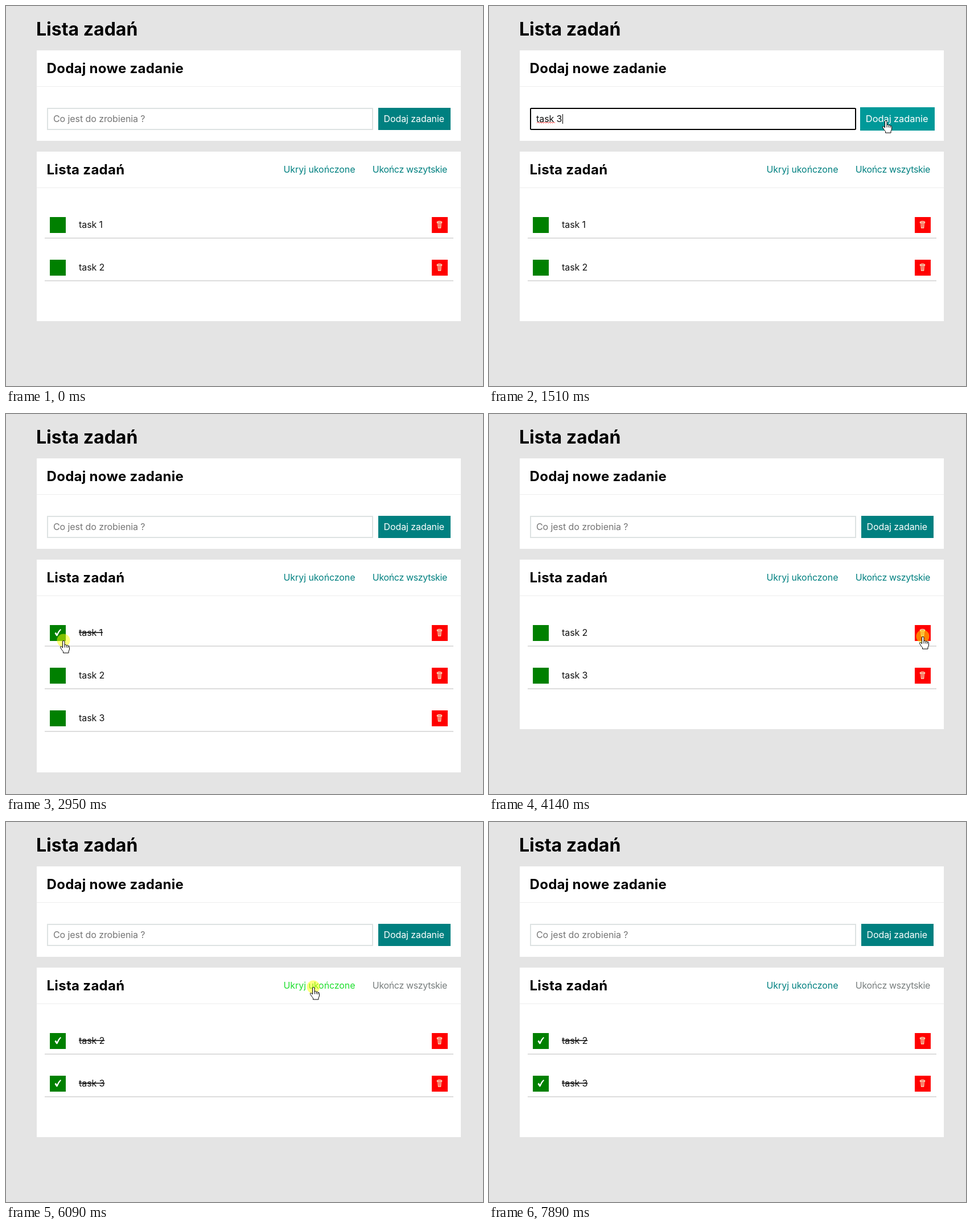
Write an HTML page that moves like this. It is 838x668 px and loops after 8000 ms.

```html
<!DOCTYPE html>
<html lang="pl">
<head>
<meta charset="utf-8">
<title>Lista zadań</title>
<style>
  html, body { margin: 0; width: 100%; height: 100%; overflow: hidden; background: #e4e4e4; }
  svg { display: block; width: 100%; height: 100%; }
  rect { shape-rendering: crispEdges; }
  text { font: 400 16px Inter, "Open Sans", sans-serif; letter-spacing: -.08px; white-space: pre; }
  .h1 { font-size: 32px; font-weight: 700; letter-spacing: 0; }
  .h2 { font-size: 24px; font-weight: 700; letter-spacing: .3px; }
  .end { text-anchor: end; }
  .tight { letter-spacing: -.35px; }
  .done { text-decoration: line-through; }
</style>
</head>
<body>
<svg viewBox="0 0 838 668">
  <rect width="838" height="668" fill="#e4e4e4"/>
  <text class="h1" x="53" y="52">Lista zadań</text>

  <rect x="54" y="78" width="745" height="159" fill="#fff"/>
  <path d="M54 141.500H799" stroke="#eee"/>
  <text class="h2" x="71.500" y="118">Dodaj nowe zadanie</text>
  <rect id="field" x="73" y="180" width="571" height="37" fill="#fff" stroke-width="2"/>
  <text id="entry" x="83" y="204"></text>
  <path id="squiggle" fill="none" stroke="#f33" stroke-width=".9"/>
  <path id="caret" d="M0 190V207" stroke="#000"/>
  <g id="button">
    <rect id="face" x="654" y="179" width="127" height="39"/>
    <text x="663.500" y="204" fill="#fff">Dodaj zadanie</text>
  </g>

  <rect id="card" x="54" y="256" width="745" fill="#fff"/>
  <path d="M54 319.500H799" stroke="#eee"/>
  <text class="h2" x="71.500" y="296">Lista zadań</text>
  <text id="toggle" class="end" x="613.500" y="293"></text>
  <text id="finish" class="end tight" x="775" y="293">Ukończ wszytskie</text>
  <g id="rows"></g>

  <circle id="press" r="11.500" fill="#ff0" fill-opacity=".5"/>
  <g id="cursor" stroke="#000" fill="#fff" stroke-linejoin="round">
    <path id="hand" d="M-1.500 13V2Q-1.500 .5 .2 .5T2 2V8Q4.500 6.500 5.200 8.700Q7.500 7.500 8 9.700Q10.500 9 10.500 11.500V15Q10.500 17 9 19V22H-.5V19.500Q-3 17 -5.500 12.500Q-6 10.500 -4.200 10.600Q-3 10.800 -1.500 13ZM2 8V12.500M5.200 9V12.500M8 10V13"/>
    <path id="arrow" d="M0 0V16L3.700 12.500 6.200 18 8.600 17 6.200 11.500H11.300Z"/>
    <path id="beam" d="M-3-8H3M0-8V8M-3 8H3" fill="none"/>
  </g>
</svg>
<script>
const LOOP = 8000;
const $ = id => document.getElementById(id);
const set = (el, attrs) => { for (const k in attrs) el.setAttribute(k, attrs[k]); };
const show = (el, on) => { el.style.display = on ? "" : "none"; };
const within = (t, a, b) => t >= a && t < b;
const linear = (t, a, b) => Math.min(1, Math.max(0, (t - a) / (b - a)));
const ramp = (t, a, b) => {
  const k = linear(t, a, b);
  return k * k * (3 - 2 * k);
};
const mix = (a, b, k) => `rgb(${a.map((v, i) => Math.round(v + (b[i] - v) * k))})`;

const TEAL = [0, 128, 128], BRIGHT = [0, 153, 153], LIME = [30, 222, 46], GREY = [120, 126, 126];

// The pointer glides to each stop, then clicks; the page reacts a moment later.
const SETTLE = 100, REACT = 130, GLOW = 220;
const start = { x: 698, y: 522, from: 0, to: 70, shape: "arrow" };
const field = { x: 320, y: 202, from: 70, to: 340, shape: "beam" };
const add = { x: 697, y: 201, from: 940, to: 1420, shape: "hand" };
const check = { x: 101, y: 398, from: 2290, to: 2640, shape: "hand" };
const bin = { x: 762, y: 391, from: 3140, to: 3900, shape: "hand" };
const finish = { x: 694, y: 291, from: 4240, to: 4740, shape: "hand" };
const hide = { x: 540, y: 290, from: 5450, to: 5950, shape: "hand" };
const reveal = { x: 541, y: 290, from: 6300, to: 6950, shape: "hand" };
const leave = { x: 528, y: -25, from: 7200, to: 7850, shape: "arrow" };
const STOPS = [start, field, add, check, bin, finish, hide, reveal, leave];

const clickAt = stop => stop.to + SETTLE;
const after = (t, stop) => t >= clickAt(stop) + REACT;
const hover = (t, stop, next) =>
  ramp(t, stop.to - 120, stop.to + 40) - ramp(t, next.from, next.from + 280);

const PITCH = 75.2;
const rows = [0, 1, 2].map(i => {
  const g = document.createElementNS("http://www.w3.org/2000/svg", "g");
  set(g, { transform: `translate(0 ${Math.round(PITCH * i)})` });
  g.innerHTML = `
    <rect x="77" y="371" width="28" height="28" fill="#008000"/>
    <path class="tick" fill="#fff" d="M85.500 385.500L87.500 383.500 89.500 386.500Q92 381 95.500 378L97 379Q92.500 384 90.300 390.300H88.500Z"/>
    <text x="128" y="389.500" fill="#111"></text>
    <rect x="748" y="371" width="28" height="28" fill="#f00"/>
    <path d="M757.500 379.500Q761.500 377.500 765.500 379.500V381H757.500ZM759 381L759.600 390H763.600L764.200 381M761.600 382V389"
      fill="none" stroke="#f5e3c0" stroke-width="1.300"/>
    <path d="M68 408H786" stroke="#ddd" stroke-width="2"/>`;
  $("rows").append(g);
  return { g, label: g.querySelector("text"), tick: g.querySelector(".tick") };
});
set($("squiggle"), { d: "M84 206" + "l2-2 2 2".repeat(8) });

function visibleTasks(t) {
  if (after(t, hide) && !after(t, reveal)) return [];
  return [1, 2, 3].filter(n => (n > 1 || !after(t, bin)) && (n < 3 || after(t, add)));
}

function drawForm(t) {
  const focus = within(t, clickAt(field), clickAt(check));
  const letters = Math.max(0, Math.ceil((t - 680) / 85));
  const typed = after(t, add) ? "" : "task 3".slice(0, letters);
  const entry = $("entry");
  set($("field"), { stroke: focus ? "#000" : "#dde2e2", rx: focus ? 2 : 0 });
  entry.textContent = typed || "Co jest do zrobienia ?";
  set(entry, { fill: typed ? "#111" : "#757575" });
  show($("squiggle"), typed.length > 4);
  show($("caret"), focus && (typed || t % 1000 < 500));
  const x = 83.5 + (typed ? entry.getComputedTextLength() : 0);
  set($("caret"), { transform: `translate(${Math.round(x) + .5} 0)` });

  const k = hover(t, add, check);
  set($("button"), { transform: `translate(717.5 199) scale(${1 + .03 * k}) translate(-717.5 -199)` });
  set($("face"), { fill: mix(TEAL, BRIGHT, k) });
}

function drawList(t) {
  const tasks = visibleTasks(t);
  set($("card"), { height: 148 + PITCH * tasks.length });
  rows.forEach(({ g, label, tick }, i) => {
    const n = tasks[i];
    const done = after(t, n === 1 ? check : finish);
    show(g, n);
    label.textContent = "task " + n;
    label.setAttribute("class", done ? "done" : "");
    show(tick, done);
  });
  $("toggle").textContent = (tasks.length ? "Ukryj" : "Pokaż") + " ukończone";
  set($("toggle"), { fill: mix(TEAL, LIME, hover(t, hide, leave)) });
  const off = clickAt(finish) + REACT;
  set($("finish"), {
    fill: t < off ? mix(TEAL, LIME, hover(t, finish, hide)) : mix(LIME, GREY, ramp(t, off, off + 200))
  });
}

function drawPointer(t) {
  const i = Math.max(1, STOPS.findLastIndex(s => t >= s.from));
  const a = STOPS[i - 1], b = STOPS[i];
  const k = ramp(t, b.from, b.to);
  const sag = .05 * Math.hypot(b.x - a.x, b.y - a.y) * Math.sin(Math.PI * k);
  const x = a.x + (b.x - a.x) * k, y = a.y + (b.y - a.y) * k + sag;
  const same = Math.abs(b.x - a.x) < 5;
  const shape = k > .95 || same ? b.shape : k < .05 ? a.shape : "arrow";
  const seen = t >= start.to;
  for (const id of ["hand", "arrow", "beam"]) show($(id), seen && id === shape);
  show($("press"), STOPS.some(s => s !== start && within(t, clickAt(s), clickAt(s) + GLOW)));
  set($("cursor"), { transform: `translate(${x} ${y})` });
  set($("press"), { cx: x, cy: y });
}

function draw(t) {
  drawForm(t);
  drawList(t);
  drawPointer(t);
}

const began = performance.now();
function frame(now) {
  draw(Math.max(0, now - began) % LOOP);
  requestAnimationFrame(frame);
}
draw(0);
requestAnimationFrame(frame);
</script>
</body>
</html>
```
